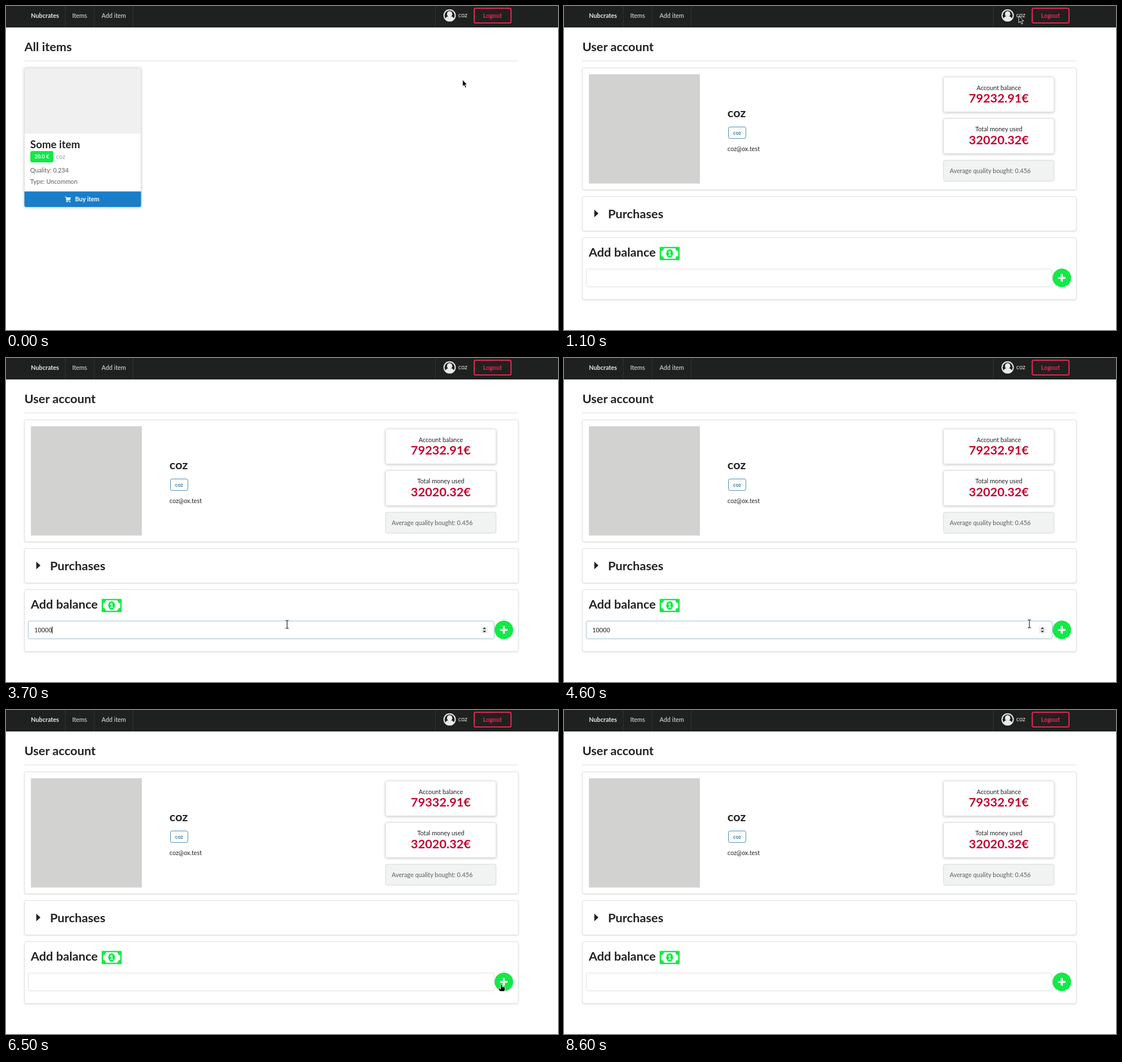
Animation of 975 by 574 pixels, one loop 8900 ms. Source, as an HTML page:

```html
<!DOCTYPE html>
<html lang="en">
<head>
<meta charset="utf-8">
<title>User account</title>
<style>
  html, body { margin: 0; width: 100%; height: 100%; overflow: hidden; background: #fefffe; }
  svg { display: block; width: 100vw; height: 100vh; }
  text { font: 10.85px Lato, sans-serif; fill: #212222; white-space: pre; }
  .b { font-weight: 700; }
  .h1 { font-size: 21.7px; font-weight: 700; }
  .h2 { font-size: 18.6px; font-weight: 700; }
  .tag { font-size: 9.3px; font-weight: 700; }
  .mid { text-anchor: middle; }
  .light { fill: #e9e9e9; }
  .white { fill: #fff; }
  .soft { fill: #5c5d5d; }
  .pale { fill: #a0a1a1; }
  .money { fill: #c1062f; }
  .green { fill: #13e947; }
  .box { fill: #fefffe; stroke: #dedfdf; }
  .segment { filter: drop-shadow(0 1px 1px rgba(34, 36, 38, .12)); }
  .raised { filter: drop-shadow(0 1px 2px rgba(34, 36, 38, .25)); }
  #field.focus { stroke: #9dbfd4; }
  #add.hover { fill: #12d63e; }
  .hide { display: none; }
</style>
</head>
<body>
<svg viewBox="0 0 975 574">
  <g id="nav">
    <rect width="975" height="38" fill="#1f2120"/>
    <path d="M104.5 0V38M155.5 0V38M224.5 0V38M758.5 0V38" stroke="#303231"/>
    <text class="b light mid" x="68.8" y="20.7">Nubcrates</text>
    <text class="light" x="117" y="20.7">Items</text>
    <text class="light" x="168.7" y="20.7">Add item</text>
    <g class="light">
      <clipPath id="round"><circle cx="783.6" cy="16.7" r="10"/></clipPath>
      <circle cx="783.6" cy="16.7" r="9.9" fill="none" stroke="#e9e9e9" stroke-width="2"/>
      <ellipse cx="783.6" cy="14.2" rx="4.7" ry="5.2"/>
      <path d="M775 26C776 20 779 18.6 780.5 18.4H786.7C789 18.8 791.5 20.5 792.2 26Z" clip-path="url(#round)"/>
    </g>
    <text class="light" x="798.8" y="20.3">coz</text>
    <rect x="827" y="4" width="65" height="26" rx="2.5" fill="none" stroke="#dc2a50" stroke-width="2"/>
    <text class="b mid" x="859.2" y="20.7" style="fill:#e32b55">Logout</text>
  </g>
  <path d="M32 97.3H905" stroke="#dedfdf"/>

  <g id="shop">
    <text class="h1" x="32.4" y="80">All items</text>
    <rect class="box raised" x="32.5" y="109.5" width="206" height="246.5" rx="3"/>
    <path d="M33 226V112.5Q33 110 35.5 110H235.500Q238 110 238 112.500V226Z" fill="#f0f0f0"/>
    <text class="h2" x="42.8" y="252">Some item</text>
    <rect class="green" x="43" y="257" width="40.700" height="20" rx="3"/>
    <text class="tag white mid" x="63.3" y="270.4">20.0 €</text>
    <text class="pale" x="88.600" y="270.6">coz</text>
    <text class="soft" x="42.8" y="294.5">Quality: 0.234</text>
    <text class="soft" x="42.8" y="314.6">Type: Uncommon</text>
    <path d="M32.500 328.5H238.500V353Q238.500 356 235.500 356H35.500Q32.500 356 32.500 353Z" fill="#197dca"/>
    <g fill="#e8f2fa">
      <path d="M104 337.500H106.500L107 339H114.600L113.600 343.600L107.600 344.300L107.800 345H113.300V346H106.700L106.500 344.500L105.600 338.600H104Z"/>
      <circle cx="107.700" cy="347" r="1.100"/><circle cx="112.700" cy="347" r="1.100"/>
    </g>
    <text class="b white" x="122" y="346.400">Buy item</text>
  </g>

  <g id="account">
    <text class="h1" x="32.4" y="80">User account</text>
    <g class="segment">
      <rect class="box" x="32.5" y="109.5" width="872.5" height="216" rx="3"/>
      <rect class="box" x="32.5" y="337.5" width="872.5" height="61" rx="3"/>
      <rect class="box" x="32.5" y="410.5" width="872.5" height="109.500" rx="3"/>
    </g>
    <rect x="44" y="121" width="196" height="193.500" fill="#d2d2d1"/>
    <text class="h1" x="288.800" y="197">coz</text>
    <rect x="290.500" y="214.300" width="30.700" height="20.400" rx="3" fill="#fefffe" stroke="#4a87b5"/>
    <text class="tag mid" x="305.800" y="227.800" style="fill:#2f76ac">coz</text>
    <text x="288.800" y="257.200">coz@ox.test</text>

    <g class="raised">
      <rect class="box" x="670.300" y="125.800" width="195.200" height="62" rx="3"/>
      <rect class="box" x="670.300" y="199.500" width="195.200" height="62" rx="3"/>
    </g>
    <rect x="670.300" y="273.300" width="195.200" height="37" rx="3" fill="#f1f3f3" stroke="#d6d7d7"/>
    <text class="mid" x="768" y="148.700">Account balance</text>
    <text class="h1 money mid" id="balance" x="768" y="171.200"></text>
    <text class="mid" x="768" y="222.400">Total money used</text>
    <text class="h1 money mid" x="768" y="244.800">32020.32€</text>
    <text class="soft" x="681.300" y="296.400">Average quality bought: 0.456</text>

    <path d="M53.500 360.800L60.800 367.500L53.500 374.200Z" fill="#212222"/>
    <text class="h1" x="77.700" y="376">Purchases</text>

    <text class="h1" x="43.700" y="443.500">Add balance</text>
    <rect class="green" x="169" y="426.700" width="35.300" height="23.600" rx="1"/>
    <path class="white" d="M176.500 429.300H196.800A5 5 0 0 0 201.700 434.200V442.800A5 5 0 0 0 196.800 447.700H176.500A5 5 0 0 0 171.600 442.800V434.200A5 5 0 0 0 176.500 429.300Z"/>
    <ellipse class="green" cx="186.600" cy="438.500" rx="6" ry="7.400"/>
    <path class="white" d="M186 434H187.900V441.200H189.700V442.700H183.900V441.200H185.800V436.300L184.400 437.300L183.500 436.200Z"/>

    <rect class="box" id="field" x="39.300" y="466" width="823" height="31.500" rx="3"/>
    <text id="amount" x="50" y="485.600"></text>
    <path id="caret" d="M.5 475.500V488" stroke="#111"/>
    <g id="spinner">
      <rect x="839" y="475.500" width="12" height="12.500" fill="#efefef"/>
      <path d="M842 480.300L845 477L848 480.300ZM842 483.200L845 486.500L848 483.200Z" fill="#333"/>
    </g>
    <circle class="green" id="add" cx="879.400" cy="481.700" r="16.400"/>
    <path d="M879.300 476.400V487M874 481.700H884.600" stroke="#effff2" stroke-width="3.600" stroke-linecap="round"/>
  </g>

  <g id="cursor" stroke="#fff" stroke-width=".9" stroke-linejoin="round">
    <path id="arrow" d="M.3 .5V12.600L3 10.200L5.200 15L7.300 14L5.200 9.400H8.800Z" fill="#0a0a0a"/>
    <path id="hand" d="M-1.500 .6Q0 -1 1.200 .6V4.500L3 4.300L5.700 5.300Q6.800 5.800 6.600 8L5.400 12.500H-2.500L-5.800 8Q-5.800 6 -3.600 7L-1.500 8.600Z" fill="#0a0a0a"/>
    <g id="beam" fill="none">
      <path d="M-3.200 -7H-1Q0 -7 0 -6Q0 -7 1 -7H3.200M0 -6V6M-3.200 7H-1Q0 7 0 6Q0 7 1 7H3.200" stroke-width="2.400"/>
      <path d="M-3 -7H-1Q0 -7 0 -6Q0 -7 1 -7H3M0 -6V6M-3 7H-1Q0 7 0 6Q0 7 1 7H3" stroke="#222" stroke-width="1.200"/>
    </g>
  </g>
</svg>
<script>
  const LOOP = 8900, STEP = 100;
  const START = [806, 130];

  // first step, last step, end point
  const moves = [
    [100, 500, 803, 17],
    [1600, 2100, 496.500, 448],
    [2300, 2500, 496.500, 472],
    [4300, 4500, 814, 513],
    [4600, 4600, 822, 471],
    [4800, 4900, 849, 483],
    [5100, 5200, 868, 491],
    [5300, 5300, 874, 486],
    [5400, 5400, 875, 486],
    [7200, 7200, 871, 483],
    [7300, 7700, 574, 297.500],
    [7900, 7900, 224, 135.500],
    [8200, 8500, 35, 2]
  ];

  const shapes = [
    [0, 'arrow'], [400, 'hand'], [800, 'arrow'], [1300, 'hand'], [1600, 'arrow'],
    [2400, 'beam'], [4400, 'arrow'], [4600, 'beam'], [4900, 'arrow'],
    [5200, 'hand'], [6300, 'arrow'], [6500, 'hand'], [7300, 'arrow'], [8600, '']
  ];

  const typed = [[0, ''], [3200, '10'], [3400, '100'], [3600, '1000'], [3700, '10000'], [6300, '']];

  const $ = id => document.getElementById(id);
  const show = (id, on) => $(id).classList.toggle('hide', !on);
  const at = (list, t) => list.filter(([from]) => from <= t).pop()[1];
  const within = (t, from, to) => t >= from && t < to;
  const ease = p => p * p * (3 - 2 * p);

  function pointer(t) {
    let [x, y] = START;
    for (const [from, to, endX, endY] of moves) {
      if (t < from) break;
      const p = ease(Math.min(1, (t - from + STEP) / (to - from + STEP)));
      x += (endX - x) * p;
      y += (endY - y) * p;
    }
    return [x, y];
  }

  function draw(t) {
    show('shop', t < 1100);
    show('account', t >= 1100);

    $('balance').textContent = t < 6300 ? '79232.91€' : '79332.91€';
    $('amount').textContent = at(typed, t);
    $('field').classList.toggle('focus', within(t, 2600, 5700));
    $('add').classList.toggle('hover', within(t, 5200, 6300) || within(t, 7200, 7300));
    show('spinner', within(t, 2400, 5800));

    const caretOn = within(t, 2600, 4300) || within(t, 5100, 5700);
    show('caret', caretOn);
    if (caretOn) {
      const x = Math.round(50 + $('amount').getComputedTextLength());
      $('caret').setAttribute('transform', `translate(${x} 0)`);
    }

    const shape = at(shapes, t);
    for (const id of ['arrow', 'hand', 'beam']) show(id, id === shape);
    $('cursor').setAttribute('transform', `translate(${pointer(t)})`);
  }

  const begin = performance.now();
  function tick() {
    const t = (performance.now() - begin) % LOOP;
    draw(Math.floor(t / STEP) * STEP);
    requestAnimationFrame(tick);
  }
  tick();
</script>
</body>
</html>
```
